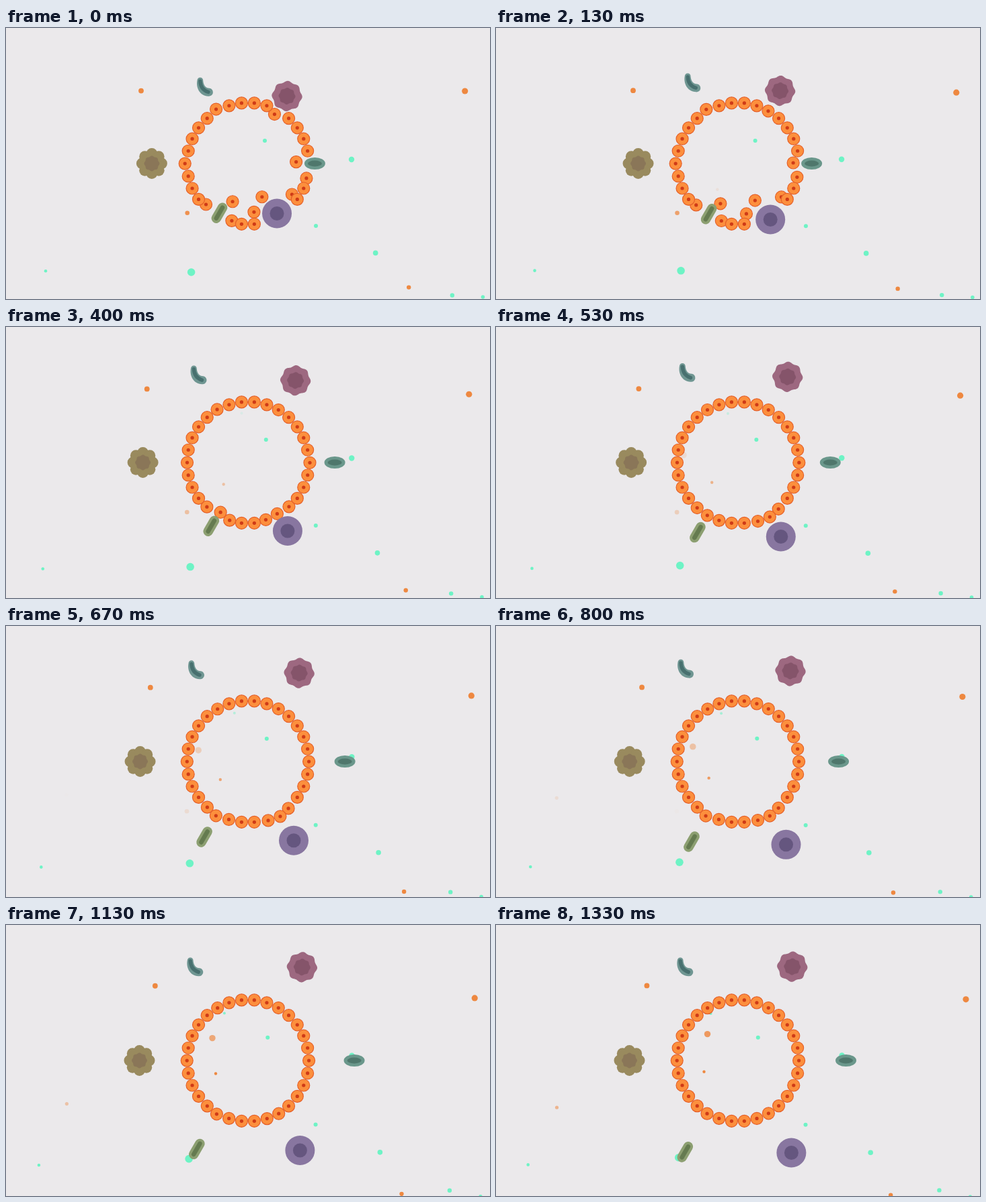
Recreate the animation shown at these times as an HTML page with a canvas. Size 720 by 404 pixels, loop 1.39 s.

```html
<!DOCTYPE html>
<html lang="en">
<head>
<meta charset="utf-8">
<title>Cell ring</title>
<style>
html, body { margin: 0; height: 100%; overflow: hidden; background: #ebe9eb; }
canvas { display: block; }
</style>
</head>
<body>
<canvas id="stage" width="720" height="404"></canvas>
<script>
const ctx = document.getElementById('stage').getContext('2d');
const LOOP = 1390, STEPS = 20, SPAN = 23.3;
const TAU = Math.PI * 2, DEG = TAU / 360;
const CX = 359.9, CY = 202.1, RING = 90.7, FAR = 161.5, NEAR = 85.1;
const MINT = '#6ef3c5', AMBER = '#ee8840';

// Germs sit every 60 degrees from the left: drawing, starting phase, snap-back speed of nearby cells
const GERMS = [
  [flower, 25.4, 1.5], [bean, 32.8, 0.9], [wavy, 42.4, 3.3],
  [oval, 52, 2.1], [disc, 60.3, 1.1], [rod, 66.8, 0.95]
];

// Starting push of the cells that a germ has hit, by cell angle
const PUSHED = {
  0: [-19, -2.5], 12: [-1.7, 3],
  48: [4.8, -21.5], 60: [-24.4, -28.9], 72: [-19, -14],
  108: [4, -1], 120: [22.5, -21.9], 132: [-1.7, -6.5],
  180: [-3, 0], 240: [-2, -2.5], 300: [-5.8, 5]
};

const beanBody = new Path2D('M-9.5-9.4C-11.5 1-6 13.5 7 14.1A6 6 0 0 0 9 2.2C3.5 2.4-.3-2-.7-9.3A4.4 4.4 0 0 0-9.5-9.4Z');
const beanCore = new Path2D('M-5-8.4Q-4.4 4.4 7 8');
const rodAxis = new Path2D('M4.6-8L-4.6 8');

const clamp = v => Math.min(1, Math.max(0, v));

function ellipse(x, y, rx, ry, fill) {
  ctx.beginPath();
  ctx.ellipse(x, y, rx, ry, 0, 0, TAU);
  ctx.fillStyle = fill;
  ctx.fill();
}

function circle(x, y, r, fill) {
  ellipse(x, y, r, r, fill);
}

function line(path, width, color) {
  ctx.lineCap = 'round';
  ctx.lineWidth = width;
  ctx.strokeStyle = color;
  ctx.stroke(path);
}

// Eight soft lobes around a circle
function lobes(r, depth, turn, fill) {
  ctx.beginPath();
  for (let a = 0; a < TAU; a += TAU / 128) {
    const d = r + depth * Math.cos(8 * (a - turn));
    ctx.lineTo(d * Math.cos(a), d * Math.sin(a));
  }
  ctx.fillStyle = fill;
  ctx.fill();
}

function oval() {
  ellipse(0, 0, 15.5, 9.1, '#6a978b');
  ellipse(0, 0, 10.5, 4.4, '#4f776c');
}

function disc() {
  circle(0, 0, 22, '#8876a0');
  circle(0, 0, 10.5, '#65567f');
}

function rod() {
  line(rodAxis, 14.5, '#8c9f71');
  line(rodAxis, 6.5, '#657b50');
}

function flower() {
  circle(0, 0, 18, '#998a5e');
  for (let n = 0; n < 8; n++) {
    circle(14.6 * Math.cos(n * TAU / 8), 14.6 * Math.sin(n * TAU / 8), 8.4, '#998a5e');
  }
  lobes(10.9, 0.6, 0, '#8a7658');
}

function bean() {
  ctx.fillStyle = '#6f9692';
  ctx.fill(beanBody);
  line(beanCore, 5.4, '#48706f');
}

function wavy() {
  lobes(21.6, 1.1, 0.06, '#9d6880');
  lobes(11.9, 0.6, 0.06, '#85546a');
}

function cell(x, y) {
  circle(x, y, 9, '#fc8f3d');
  ctx.lineWidth = 1.2;
  ctx.strokeStyle = '#e5602a';
  ctx.stroke();
  circle(x, y, 2.6, '#cf3b17');
}

// Free dots drift in straight lines; some fade in after birth or out before death
function drawDots(u) {
  const dot = (color, r, x, y, dx, dy, born = -1, dies = 2) => {
    ctx.globalAlpha = clamp(1.3 * Math.min(u - born, dies - u));
    circle(x + dx * u, y + dy * u, r, color);
  };
  dot(MINT, 3, 385, 168, 4.8, -0.2);
  dot(MINT, 4.2, 514, 196, 0.6, -1.5);
  dot(MINT, 3, 461, 295, -0.5, 2.8);
  dot(MINT, 3.8, 549.7, 335.4, 7.5, 3.9);
  dot(MINT, 2.3, 59, 362.3, -11.3, -4.9);
  dot(MINT, 5.8, 275.6, 364, -3.9, -17.3);
  dot(MINT, 3.2, 663.8, 398.5, -4.4, -3.1);
  dot(MINT, 2.8, 709.4, 401, -3.9, 4.4);
  dot(MINT, 2, 369, 126.4, -49.5, 5.6, 0.26);
  dot(AMBER, 3.9, 201, 93.6, 23.4, -3.2);
  dot(AMBER, 4.6, 682.7, 94, 16.3, 16.8);
  dot(AMBER, 3.2, 599.2, 386.6, -12, 16);
  dot(AMBER, 3.3, 269.7, 275.7, -1.2, 0.9, -1, 0.7);
  dot(AMBER, 2.2, 332.2, 244, -22.7, -25.3, 0.05);
  dot(AMBER, 4.7, 245.5, 217.7, 69, -55.1, 0.37);
  dot(AMBER, 2.6, 89.6, 222.2, 0.9, 49.8, 0.58);
  ctx.globalAlpha = 1;
}

// Damped spring, from 1 through a small overshoot to rest
function spring(t) {
  return Math.exp(-((t / 11.5) ** 2)) * Math.cos(8.5 * DEG * t);
}

// Pushed cells lie under the settled ones
function drawCells(t) {
  for (const pushed of [true, false]) {
    for (let deg = 0; deg < 360; deg += 12) {
      if (deg in PUSHED !== pushed) continue;
      const [dx, dy] = PUSHED[deg] || [0, 0];
      const snap = GERMS[Math.round((deg + 180) / 60) % 6][2];
      const f = spring(t * snap);
      cell(CX + RING * Math.cos(deg * DEG) + dx * f, CY + RING * Math.sin(deg * DEG) + dy * f);
    }
  }
}

// Each germ backs away along its ray, later ones faster
function drawGerms(t) {
  GERMS.forEach(([paint, phase, ], i) => {
    const left = Math.max(0, phase - (1.42 + 0.19 * i) * t) * DEG;
    const d = Math.max(NEAR, FAR - 100 * Math.sin(left) ** 2);
    const a = (180 + 60 * i) * DEG;
    ctx.save();
    ctx.translate(360 + d * Math.cos(a), 202 + d * Math.sin(a));
    paint();
    ctx.restore();
  });
}

function draw(step) {
  const p = step / STEPS;
  const u = p + 0.09 * Math.sin(Math.PI * p);
  ctx.fillStyle = '#ebe9eb';
  ctx.fillRect(0, 0, 720, 404);
  drawDots(u);
  drawCells(SPAN * u);
  drawGerms(SPAN * u);
}

// Fifteen steps a second, each starting on a whole hundredth
function stepAt(ms) {
  const n = Math.round(ms * 3 / 200);
  return Math.round(n * 20 / 3) * 10 > ms ? n - 1 : n;
}

const start = performance.now();
function tick() {
  draw(Math.min(STEPS, stepAt((performance.now() - start) % LOOP)));
  requestAnimationFrame(tick);
}
tick();
</script>
</body>
</html>
```
